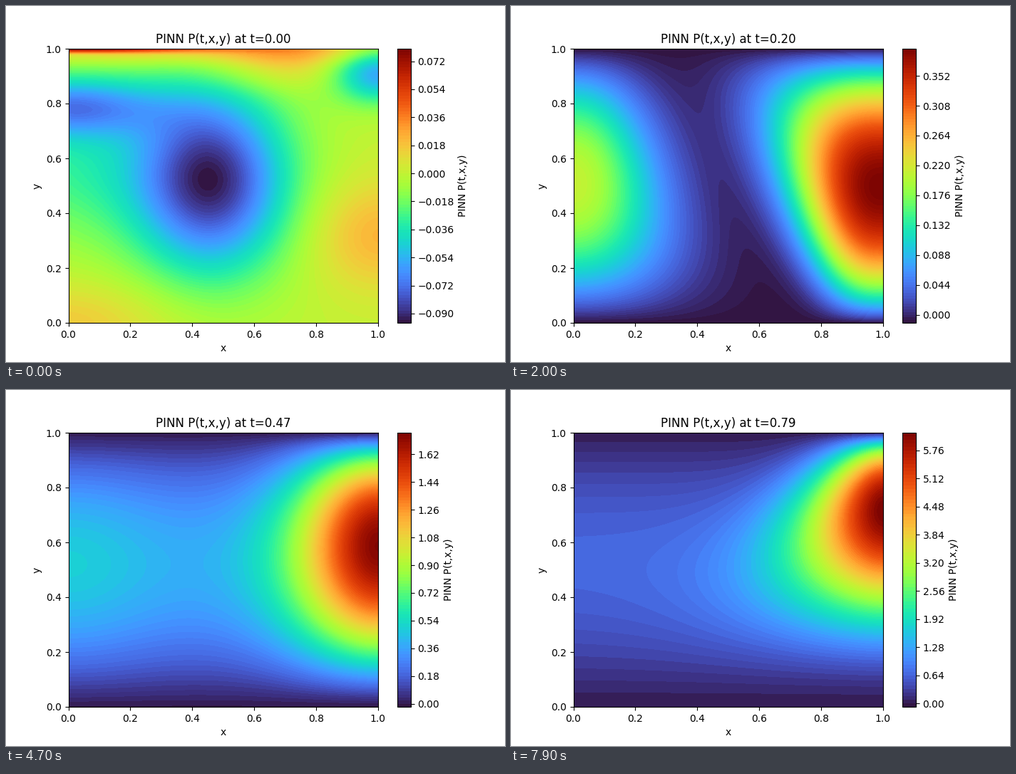
Animation, 700 px wide and 500 px high, one loop 8 s. Source, as a matplotlib script:

```python
import numpy as np
import matplotlib.pyplot as plt
from matplotlib.animation import FuncAnimation

FRAMES, STEP_MS = 80, 100
T_EARLY, T_GROWTH = 0.07, 0.20

axis = np.linspace(0, 1, 100)
X, Y = np.meshgrid(axis, axis)


def spot(x, y, wx, wy):
    return np.exp(-((X - x) / wx) ** 2 - ((Y - y) / wy) ** 2)


def fit(field, lo, hi):
    """Rescale a field to span lo..hi."""
    return lo + (hi - lo) * (field - field.min()) / np.ptp(field)


def mix(a, b, s):
    return a + (b - a) * s


def growth(t):
    """Channel flow with a fading left swell and a growing right peak."""
    u = t - T_GROWTH
    tilt = 0.45 - t

    base = -0.003 + 1.58 * u - 0.75 * u ** 2
    reach_left = 0.28 - 0.6 * tilt * (Y - 0.5)
    swell = (0.30 - 0.38 * t) * np.exp(-(X / reach_left) ** 2)
    channel = np.sin(np.pi * Y ** (1 + 0.13 * t)) * (base + swell)

    # The peak climbs the right wall at a steady speed.
    top = 0.42 + 0.39 * t
    power = top / (1 - top)
    profile = (Y / top) ** power * (1 - Y) / (1 - top)
    height = 0.1585 * np.exp(4.769 * t - 0.32 * t ** 2)
    reach = 0.265 + 0.45 * (t - 0.5) ** 2 + tilt * (Y - 0.55)
    fade = np.exp(-((1 - X) / reach) ** (1.35 + 0.23 / t))
    return channel + height * profile * fade - 0.0023 / t


# Central well, left trough, right hill, corner dip and hot top edge.
START = fit(-0.56 * spot(0.46, 0.52, 0.255, 0.34)
            - 0.32 * spot(0, 0.79, 0.30, 0.11)
            - 0.16 * spot(0, 0.60, 0.30, 0.30)
            + 0.14 * spot(1, 0.32, 0.22, 0.20)
            - 0.36 * spot(1, 0.91, 0.15, 0.11)
            + 0.12 * spot(0.67, 0.95, 0.25, 0.10)
            + 0.10 * spot(0, 0, 0.35, 0.15)
            + 0.15 * spot(0.4, 1, 0.80, 0.05)
            + 0.40 * spot(0, 1, 0.45, 0.012), -0.0955, 0.0795)

EARLY = fit(-0.77 * spot(0.45, 0.54, 0.32, 0.335)
            - 0.32 * spot(0.06, 0.83, 0.30, 0.25)
            + 0.25 * spot(1, 0.28, 0.21, 0.22)
            - 0.39 * spot(1, 0.82, 0.20, 0.15)
            + 0.13 * spot(0.77, 0.97, 0.20, 0.12)
            + 0.19 * spot(0.2, 1, 0.60, 0.06)
            + 0.07 * spot(0.5, 0, 0.40, 0.06), -0.182, 0.047)


def pressure(t):
    if t <= T_EARLY:
        return mix(START, EARLY, t / T_EARLY)
    s = min((t - T_EARLY) / (T_GROWTH - T_EARLY), 1)
    return mix(EARLY, growth(t), s * s * (3 - 2 * s))


fig = plt.figure(figsize=(7, 5), dpi=100)


def draw(i):
    t = i / 100
    fig.clear()
    ax = fig.add_subplot()
    filled = ax.contourf(X, Y, pressure(t), levels=100, cmap="turbo")
    fig.colorbar(filled, ax=ax, label="PINN P(t,x,y)")
    ax.set(title=f"PINN P(t,x,y) at t={t:.2f}", xlabel="x", ylabel="y")
    return []


anim = FuncAnimation(fig, draw, frames=FRAMES, interval=STEP_MS,
                     init_func=lambda: [], repeat=True, repeat_delay=0)
plt.show()
```
